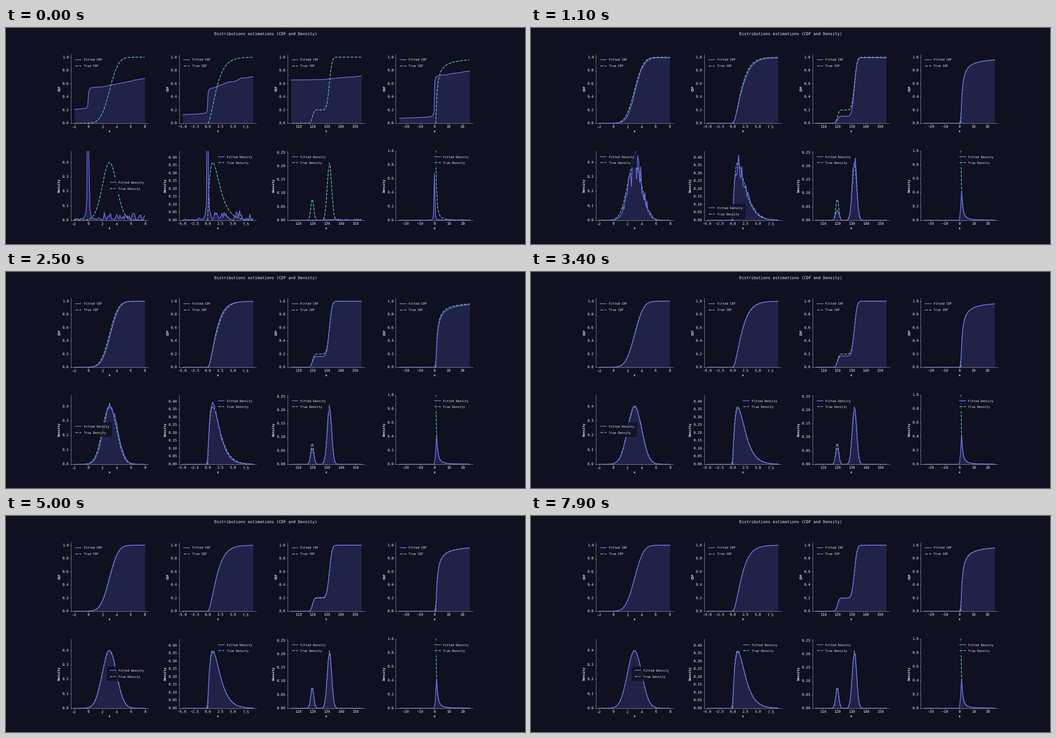
A matplotlib script that plays this animation: 1159x483 px, repeating every 8000 ms.

```python
import math
import numpy as np
import matplotlib.pyplot as plt
from matplotlib.animation import FuncAnimation

W, H, DPI = 1159, 483, 48
FRAMES, STEP = 80, 100
BG, FG, FIT, TRUE = "#0f1020", "#eeeeee", "#6c6ee8", "#58c0a8"
N = 70
KEYS = [6, 17, 34, 50, 68, 79]

plt.rcParams.update({
    "font.family": "DejaVu Sans Mono", "text.hinting": "none",
    "text.color": FG, "axes.labelcolor": FG, "axes.edgecolor": FG,
    "xtick.color": FG, "ytick.color": FG, "axes.facecolor": BG,
    "axes.spines.top": False, "axes.spines.right": False,
    "axes.labelsize": 11.1, "axes.labelweight": "bold",
    "xtick.labelsize": 12.1, "ytick.labelsize": 12.1,
})

erf = np.vectorize(math.erf)


def normal(x, mu, s=1):
    return np.exp(-0.5 * ((x - mu) / s) ** 2) / (s * math.sqrt(2 * math.pi))


def normal_cdf(x, mu, s=1):
    return 0.5 * (1 + erf((x - mu) / (s * math.sqrt(2))))


def gamma_cdf(x, scale):
    z = np.maximum(x, 0) / scale
    return 1 - (1 + z) * np.exp(-z)


def mix_cdf(x, w):
    return w * normal_cdf(x, 120) + (1 - w) * normal_cdf(x, 132, 1.5)


def pareto_cdf(x, b):
    return 1 - np.maximum(x, 1) ** -b


def smooth(y):
    return np.convolve(y, [0.12, 0.76, 0.12], "same")


# param: true parameter of the cdf; drift: fitted parameter at KEYS
# base, end: range of the untrained CDF; specks: its share of scattered mass
PANELS = [
    dict(lo=-2, hi=8, start=-2, ticks=np.arange(-2, 9, 2),
         top=0.4787, yticks=np.arange(5) / 10,
         cdf=normal_cdf, pdf=lambda x: normal(x, 3),
         param=3, drift=[3.08, 3.2, 3.04, 2.97, 3.01, 3.01],
         base=0.21, end=0.68, specks=0.3, bulk=2, rough=1,
         legend={0: "center right", 3: "upper left", 12: "center left", 42: "center right"}),
    dict(lo=-5, hi=9, start=0, ticks=np.arange(-5, 8, 2.5),
         top=0.4415, yticks=np.arange(9) / 20,
         cdf=gamma_cdf, pdf=lambda x: x * np.exp(-x),
         param=1, drift=[1.2, 0.84, 1.02, 1.01, 1.01, 1.01],
         base=0.13, end=0.705, specks=0.35, bulk=0, rough=0.6,
         legend={0: "upper right", 3: "lower left", 25: "upper right"}),
    dict(lo=104.75, hi=154.6, start=104.75, ticks=np.arange(110, 151, 10),
         top=0.2557, yticks=np.arange(6) / 20,
         cdf=mix_cdf, pdf=lambda x: 0.2 * normal(x, 120) + 0.8 * normal(x, 132, 1.5),
         param=0.2, drift=[0.08, 0.16, 0.172, 0.207, 0.2, 0.2],
         base=0.655, end=0.717, specks=1, bulk=128, rough=0.4,
         legend={0: "upper left", 3: "center left", 11: "upper left"}),
    dict(lo=-25, hi=25, start=1, ticks=np.arange(-20, 21, 10),
         top=1, yticks=np.arange(6) / 5,
         cdf=pareto_cdf, pdf=lambda x: 1 / x ** 2,
         param=1, drift=[1.2, 0.86, 1, 0.98, 0.98, 0.98],
         base=0.075, end=0.79, specks=0.12, bulk=0, rough=0.3,
         legend={0: "upper right"}),
]

fig, axes = plt.subplots(2, 4, figsize=(W / DPI, H / DPI), dpi=DPI, facecolor=BG)
fig.subplots_adjust(left=0.125, right=0.9, top=0.88, bottom=0.11, wspace=0.4, hspace=0.4)
fig.suptitle("Distributions estimations (CDF and Density)", fontsize=13.3, y=0.98)


def build(ax, x, truth, name, ticks, yticks, top, loc):
    """Set up one chart; return its line, fill and legend."""
    margin = 0.05 * (x[-1] - x[0])
    ax.set(xlim=(x[0] - margin, x[-1] + margin), ylim=(0, top),
           xticks=ticks, yticks=yticks, xlabel="x", ylabel=name)
    fill = ax.fill_between(x, 0 * x, color=FIT, alpha=0.2, lw=0, zorder=1)
    line, = ax.plot(x, 0 * x, color=FIT, lw=2.5, zorder=3, label="Fitted " + name)
    ax.plot(*truth, "--", color=TRUE, lw=2.5, zorder=2, label="True " + name)
    legend = ax.legend(loc=loc, fontsize=10.06, borderpad=1, labelspacing=1,
                       fancybox=False, facecolor=BG, edgecolor="none", framealpha=0.8)
    return line, fill, legend


def untrained(p, rng):
    """Cell masses of the first guess: a spike at zero and scattered specks."""
    spike = 1 / (1 + (p["mid"] / (0.3 * p["d"])) ** 2)
    specks = smooth(rng.random(N - 1) ** 3) * np.where(p["mid"] > p["bulk"], 1, 0.2)
    share = (1 - p["specks"]) * spike / spike.sum() + p["specks"] * specks / specks.sum()
    return share * (p["end"] - p["base"])


for i, p in enumerate(PANELS):
    rng = np.random.default_rng(i + 1)
    x = p["x"] = np.linspace(p["lo"], p["hi"], N)
    p["d"] = x[1] - x[0]
    mid = p["mid"] = x[:-1] + p["d"] / 2
    p["first"] = untrained(p, rng)
    p["phase"] = rng.uniform(0, 2 * np.pi, N - 1)
    p["rate"] = rng.uniform(0.1, 0.6, N - 1)

    tx = x[x > p["start"]]
    tm = np.r_[p["start"], mid[mid > p["start"]]]
    true_cdf = np.r_[tx[0], tx], np.r_[0, p["cdf"](tx, p["param"])]
    p["cdf_chart"] = build(axes[0, i], x, true_cdf, "CDF", p["ticks"],
                           np.arange(6) / 5, 1.05, "upper left")
    p["pdf_chart"] = build(axes[1, i], mid, (tm, p["pdf"](tm)), "Density", p["ticks"],
                           p["yticks"], p["top"], p["legend"][0])


def show(chart, x, y):
    line, fill, _ = chart
    line.set_ydata(y)
    fill.set_verts([np.column_stack([np.r_[x[0], x, x[-1]], np.r_[0, y, 0]])])


def fitted(p, n):
    """CDF offset and cell masses of the estimate at frame n."""
    guess = max(0, 1 - n / 5) ** 2
    rough = 0.4 * math.exp(-(n / 18) ** 2)
    mass = smooth(np.diff(p["cdf"](p["x"], np.interp(n, KEYS, p["drift"]))))
    ripple = 1 + (rough + 0.015) * p["rough"] * np.sin(p["phase"] + p["rate"] * n)
    trained = mass * ripple
    trained *= mass.sum() / trained.sum() * (1 - 0.03 * rough)
    return guess * p["base"], guess * p["first"] + (1 - guess) * trained


def update(n):
    for p in PANELS:
        base, mass = fitted(p, n)
        show(p["pdf_chart"], p["mid"], mass / p["d"])
        show(p["cdf_chart"], p["x"], base + np.r_[0, np.cumsum(mass)])
        p["pdf_chart"][2].set_loc(p["legend"][max(t for t in p["legend"] if t <= n)])
    return []


anim = FuncAnimation(fig, update, frames=FRAMES, interval=STEP, repeat=True, repeat_delay=0)
plt.show()
```
